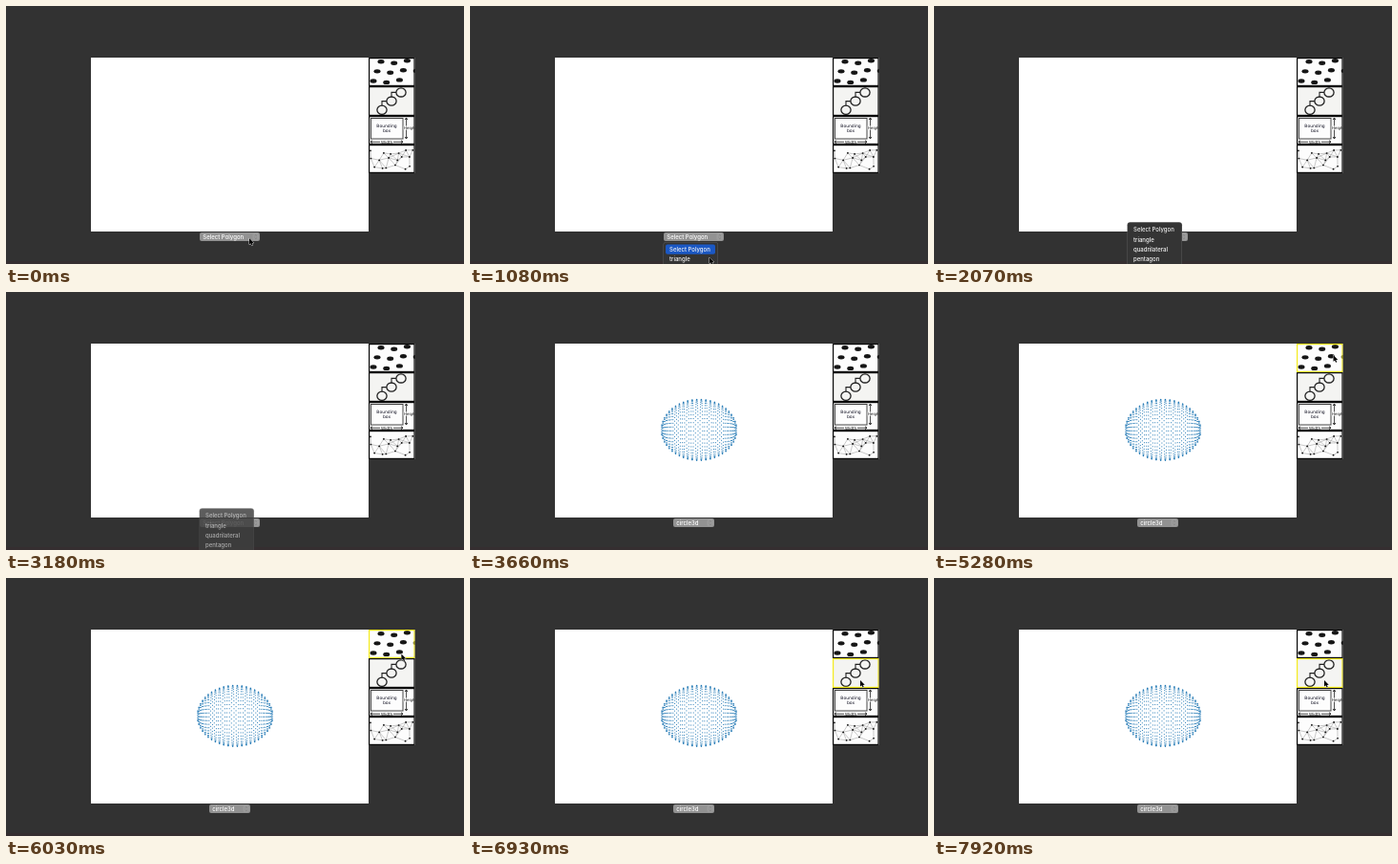
Write an HTML page with a canvas that moves like this. It is 480x270 px and loops after 8 s.

```html
<!DOCTYPE html>
<html lang="en">
<head>
<meta charset="utf-8">
<title>Polygon picker</title>
<style>
html, body { margin: 0; width: 100%; height: 100%; overflow: hidden; background: #323232; }
canvas { display: block; width: 480px; height: 270px; }
</style>
</head>
<body>
<canvas id="stage" width="480" height="270"></canvas>
<script>
const ctx = document.getElementById('stage').getContext('2d');
const LOOP = 8000, STEP = 30;
const UI = 'Inter, Roboto, sans-serif';
const WIDE = 'DejaVu Sans, sans-serif';

const smooth = p => p * p * (3 - 2 * p);
const mix = (a, b, p) => a + (b - a) * p;
const between = (a, b, p) => ({ x: mix(a.x, b.x, p), y: mix(a.y, b.y, p) });
const progress = (t, from, to) => Math.max(0, Math.min(1, (t - from) / (to - from)));

function seeded(seed) {
  return () => (seed = seed * 16807 % 2147483647) / 2147483647;
}

const BUTTON = { x: 255, y: 243 }, BELOW = { x: 248, y: 278 };
const START = { x: 322, y: 234 }, BEND = { x: 512, y: 70 };
const FIRST = { x: 417, y: 66 }, SECOND = { x: 409, y: 107 };

function pointerAt(t) {
  if (t < 1200) return between(BUTTON, BELOW, progress(t, 960, 1170));
  if (t < 4860) return null;
  if (t < 5790) {
    const p = 1 - (1 - progress(t, 4860, 5460)) ** 4;
    return between(between(START, BEND, p), between(BEND, FIRST, p), p);
  }
  const spot = between(FIRST, SECOND, progress(t, 5790, 6210) ** 2);
  const sway = Math.sin(Math.PI * progress(t, 6930, 7710));
  return { x: spot.x + 6 * sway, y: spot.y - 10 * sway };
}

function box(x, y, w, h, fill) {
  ctx.fillStyle = fill;
  ctx.fillRect(x, y, w, h);
}

function rounded(x, y, w, h, r, fill) {
  ctx.fillStyle = fill;
  ctx.beginPath();
  ctx.roundRect(x, y, w, h, r);
  ctx.fill();
}

function label(str, x, y, font, fill, align = 'left') {
  ctx.font = font;
  ctx.textAlign = align;
  ctx.fillStyle = fill;
  ctx.fillText(str, x, y);
}

function line(points, width, color) {
  ctx.strokeStyle = color;
  ctx.lineWidth = width;
  ctx.beginPath();
  points.forEach(([x, y]) => ctx.lineTo(x, y));
  ctx.stroke();
}

function oval(x, y, rx, ry) {
  ctx.beginPath();
  ctx.ellipse(x, y, rx, ry, 0, 0, Math.PI * 2);
}

// Thumbnails are drawn with their own top left corner as the origin.
function drawSpots() {
  ctx.fillStyle = '#161616';
  for (let row = 0; row < 3; row++) {
    for (let i = 0; i < 3 + row % 2; i++) {
      oval(13 - 4 * row + 13.7 * i, 4.3 + 10.1 * row + 1.5 * Math.cos(2 * i - 1.6), 3.5, 2.2);
      ctx.fill();
    }
  }
}

function drawChain() {
  for (let i = 0; i < 3; i++) {
    const x = 34 - 10 * i, y = 6.4 + 9.2 * i;
    if (i < 2) line([[x - 5, y], [x - 10, y], [x - 10, y + 5]], 1.1, '#222');
    oval(x, y, 5.1, 4.6);
    ctx.lineWidth = 1.3;
    ctx.stroke();
  }
}

function measure(length, name, gap) {
  line([[0, 0], [length, 0]], 0.8, '#222');
  line([[2, -1.4], [0, 0], [2, 1.4]], 0.9, '#222');
  line([[length - 2, -1.4], [length, 0], [length - 2, 1.4]], 0.9, '#222');
  if (!name) return;
  box(length / 2 - gap / 2, -2, gap, 4, '#fff');
  label(name, length / 2, 1.5, `4.2px ${WIDE}`, '#111', 'center');
}

function drawBounds() {
  ctx.lineWidth = 1;
  ctx.strokeStyle = '#444';
  ctx.strokeRect(2.5, 2.5, 33.5, 21.5);
  label('Bounding', 19, 12.2, `4.5px ${WIDE}`, '#112', 'center');
  label('box', 19, 16.5, `4.5px ${WIDE}`, '#112', 'center');
  ctx.save();
  ctx.translate(2, 27.2);
  measure(34, 'Width', 14);
  ctx.translate(37.5, -25.2);
  ctx.rotate(Math.PI / 2);
  measure(22);
  ctx.restore();
  box(36.7, 10.5, 11, 4, '#fff');
  label('Height', 37, 14.2, `4px ${WIDE}`, '#111');
}

function drawNetwork() {
  const rand = seeded(41);
  const nodes = Array.from({ length: 18 }, (_, i) =>
    [2 + i % 6 * 8 + rand() * 6, 4 + Math.floor(i / 6) * 8 + rand() * 6]);
  nodes.forEach((a, i) => nodes.slice(i + 1).forEach(b => {
    if (Math.hypot(a[0] - b[0], a[1] - b[1]) < 12) line([a, b], 0.45, '#888');
  }));
  nodes.forEach(([x, y]) => {
    oval(x, y, 0.95, 0.85);
    ctx.fillStyle = '#111';
    ctx.fill();
  });
}

function drawThumbs(pointer) {
  const topOf = i => 54 + Math.round(30.25 * i);
  [drawSpots, drawChain, drawBounds, drawNetwork].forEach((art, i) => {
    const top = topOf(i), h = topOf(i + 1) - top, w = 48.6;
    const hover = pointer && pointer.x >= 380 && pointer.x < 429 &&
      pointer.y >= top && pointer.y < top + h;
    ctx.save();
    ctx.translate(380, top);
    ctx.beginPath();
    ctx.rect(0, 0, w, h);
    ctx.clip();
    box(0, 0, w, h, i === 1 ? '#f4f4f2' : '#fdfdfd');
    art();
    ctx.strokeStyle = hover ? '#f5ec1c' : '#050505';
    ctx.lineWidth = 1.2;
    ctx.strokeRect(0.6, 0.6, w - 1.2, h - 1.2);
    ctx.restore();
  });
}

// Rings about a nearly horizontal axis, seen almost edge-on.
function drawSphere() {
  const rings = 24, tilt = 0.035, cap = 0.17;
  ctx.fillStyle = 'rgba(31, 119, 180, 0.85)';
  for (let i = 0; i < rings; i++) {
    const a = mix(cap, Math.PI - cap, i / (rings - 1));
    const dots = Math.round(8 + 38 * Math.sin(a));
    for (let j = 0; j < dots; j++) {
      const b = Math.PI * 2 * (j + 0.25) / dots;
      const x = -Math.cos(a) + Math.sin(a) * Math.cos(b) * tilt;
      const y = Math.sin(a) * Math.sin(b);
      ctx.fillRect(239.5 + 39.5 * x, 143.8 + 32 * y, 1.05, 1.05);
    }
  }
}

function drawButton(text, x, w) {
  rounded(x, 237, w, 9, 2, '#929292');
  rounded(x + w - 7.5, 238, 6.5, 7, 1.5, '#9b9b9b');
  const mid = x + w - 4.2;
  line([[mid - 1.2, 240.7], [mid, 239.5], [mid + 1.2, 240.7]], 0.6, '#777');
  line([[mid - 1.2, 242.5], [mid, 243.7], [mid + 1.2, 242.5]], 0.6, '#777');
  label(text, x + 3.3, 244, `500 6px ${UI}`, '#fff');
}

function drawMenu(t) {
  if (t < 780 || t >= 3270) return;
  const top = 247 - 20.7 * smooth(progress(t, 1380, 1530));
  const active = t < 1110 ? 0 : t < 1170 ? 1 : -1;
  ctx.save();
  ctx.globalAlpha = 1 - progress(t, 3120, 3270);
  rounded(202.5, top, 57.5, 60, 3, '#5a5a5a');
  rounded(203, top + 0.5, 56.5, 60, 2.5, '#343434');
  ['Select Polygon', 'triangle', 'quadrilateral', 'pentagon'].forEach((name, i) => {
    const y = top + 2.6 + i * 10.4;
    if (i === active) rounded(205, y, 52, 10.2, 2, '#1b58c4');
    label(name, 209, y + 7.3, `500 6px ${UI}`, '#f4f4f4');
  });
  ctx.restore();
}

function drawPointer({ x, y }) {
  const outline = [[0, 0], [0, 6.6], [1.5, 5.3], [2.6, 7.6], [3.7, 7.1], [2.7, 4.9], [4.7, 4.8]];
  ctx.beginPath();
  outline.forEach(([dx, dy]) => ctx.lineTo(x + dx, y + dy));
  ctx.closePath();
  ctx.lineWidth = 0.8;
  ctx.strokeStyle = '#eee';
  ctx.stroke();
  ctx.fillStyle = '#000';
  ctx.fill();
}

function draw() {
  const t = Math.floor(performance.now() % LOOP / STEP) * STEP;
  const pointer = pointerAt(t);
  box(0, 0, 480, 270, '#323232');
  box(0, 267, 480, 3, '#352e30');
  box(89, 54, 291, 182, '#fff');
  drawThumbs(pointer);
  if (t >= 3660) {
    drawSphere();
    drawButton('circle3d', 213, 43);
  } else {
    drawButton('Select Polygon', 203, 63);
  }
  drawMenu(t);
  if (pointer) drawPointer(pointer);
  requestAnimationFrame(draw);
}
requestAnimationFrame(draw);
</script>
</body>
</html>
```
